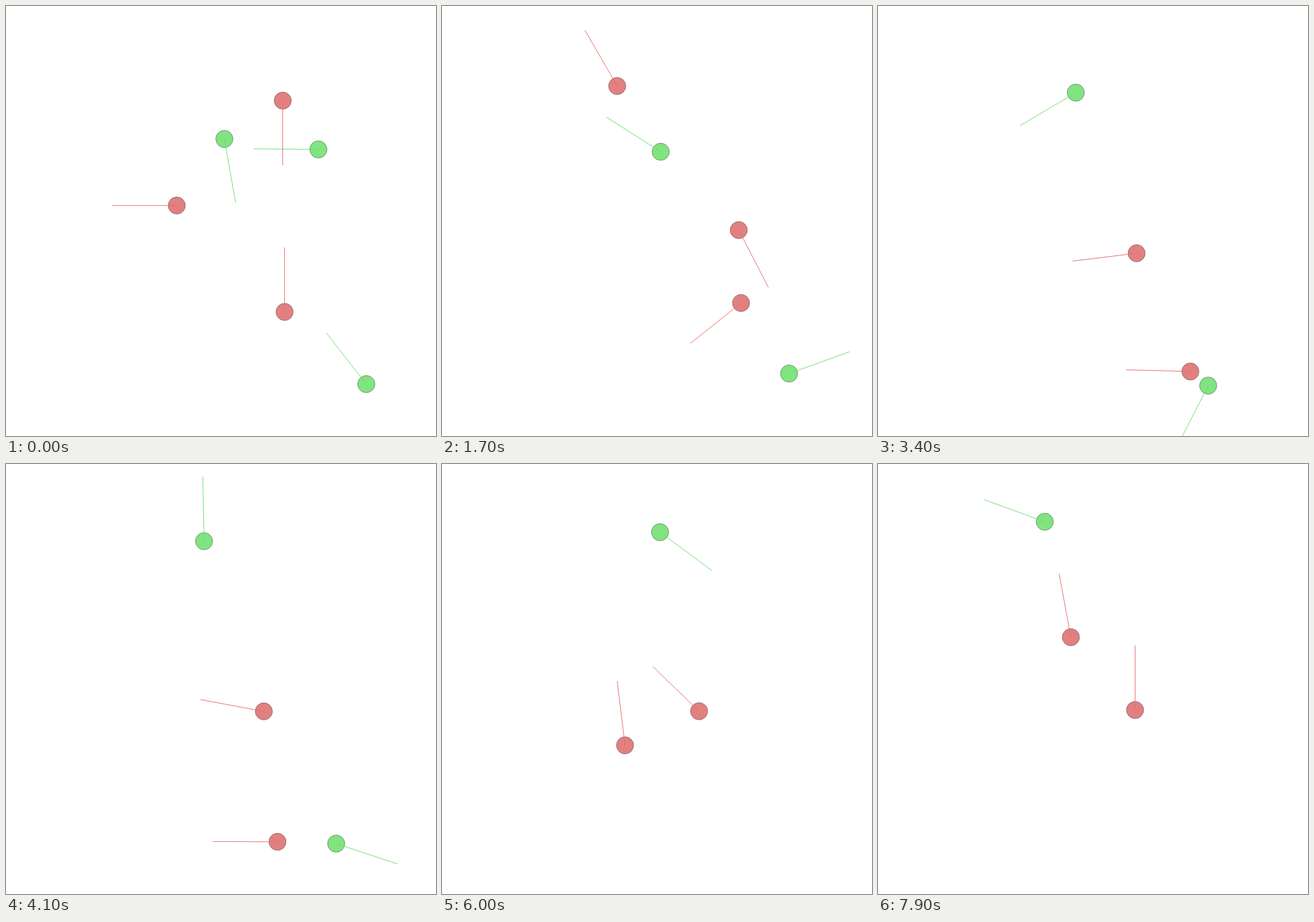
An HTML page for the animation above (8 s loop, 700 by 700 pixels).

```html
<!DOCTYPE html>
<html lang="en">
<head>
<meta charset="utf-8">
<title>Wandering agents</title>
<style>
  html, body { margin: 0; width: 100%; height: 100%; overflow: hidden; background: #fff; }
  svg { display: block; width: 700px; height: 700px; }
  circle { stroke: rgba(70, 70, 70, .55); stroke-width: 1; }
  line { stroke-width: 1; }
  .red circle { fill: #e28080; }
  .red line { stroke: #e66c6c; }
  .green circle { fill: #80e480; }
  .green line { stroke: #6cde6c; }
</style>
</head>
<body>
<svg id="stage" viewBox="0 0 700 700"></svg>
<script>
const STEP = 100, STEPS = 80, RADIUS = 14, REACH = 105;
const MARKS = [0, 10, 25, 34, 48, 60, 79]; // steps at which waypoints are reached
const stage = document.getElementById('stage');
const agents = [];

function add(parent, tag, attrs) {
  const el = document.createElementNS('http://www.w3.org/2000/svg', tag);
  for (const k in attrs) el.setAttribute(k, attrs[k]);
  return parent.appendChild(el);
}

// Waypoints are x, y, heading in degrees, one per mark; end is the step of removal.
function agent(kind, end, ...points) {
  const g = add(stage, 'g', { class: kind });
  add(g, 'circle', { r: RADIUS });
  const ray = add(g, 'line', { x1: 0, y1: 0 });
  agents.push({ g, ray, end, points });
}

agent('red', STEPS, [450.5, 154, 90], [439.5, 367.5, 119.5], [520.5, 580.5, 166.5],
  [508.5, 595, 181.5], [375.5, 636.5, 179], [298, 458, 263], [314, 282, 259.5]);
agent('red', 26, [278, 324.8, 180], [265, 131.5, 289], [298, 137.5, 184]);
agent('red', STEPS, [453.5, 498, 270], [483.5, 347, 337], [451, 399, 520.5],
  [421, 402.5, 533], [418.5, 402.5, 568], [418.5, 402.5, 584], [418.5, 400.5, 630]);
agent('green', 15, [355.5, 216.5, 80], [524.5, 313.5, 58]);
agent('green', STEPS, [508.5, 233.5, 180.5], [362, 252, 165], [362, 203, 267],
  [322, 141, 149.3], [338, 110, 388.5], [355, 111, 36.5], [271.5, 94, -160]);
agent('green', 44, [586.5, 615.5, 232], [584, 610, 559.5], [545, 595, 861],
  [537.5, 618, 1197]);

const rad = deg => deg * Math.PI / 180;

// Cubic path that leaves and arrives along the heading; the heading turns steadily.
function pose(points, step) {
  let i = 0;
  while (i < points.length - 2 && step >= MARKS[i + 1]) i++;
  const [x0, y0, a0] = points[i], [x1, y1, a1] = points[i + 1];
  const turn = (step - MARKS[i]) / (MARKS[i + 1] - MARKS[i]);
  const u = Math.min(turn, 1), v = 1 - u;
  const pull = Math.hypot(x1 - x0, y1 - y0);
  const path = (p, q, dir) =>
    v * v * (1 + 2 * u) * p + u * u * (1 + 2 * v) * q +
    u * v * pull * (v * dir(rad(a0)) - u * dir(rad(a1)));
  return {
    x: path(x0, x1, Math.cos),
    y: path(y0, y1, Math.sin),
    angle: rad(a0 + (a1 - a0) * turn)
  };
}

function draw(step) {
  for (const { g, ray, end, points } of agents) {
    g.style.display = step < end ? '' : 'none';
    const { x, y, angle } = pose(points, step);
    g.setAttribute('transform', `translate(${x} ${y})`);
    ray.setAttribute('x2', REACH * Math.cos(angle));
    ray.setAttribute('y2', REACH * Math.sin(angle));
  }
}

const start = performance.now();
function tick() {
  const elapsed = performance.now() - start;
  draw(Math.floor(elapsed / STEP) % STEPS);
  requestAnimationFrame(tick);
}
tick();
</script>
</body>
</html>
```
